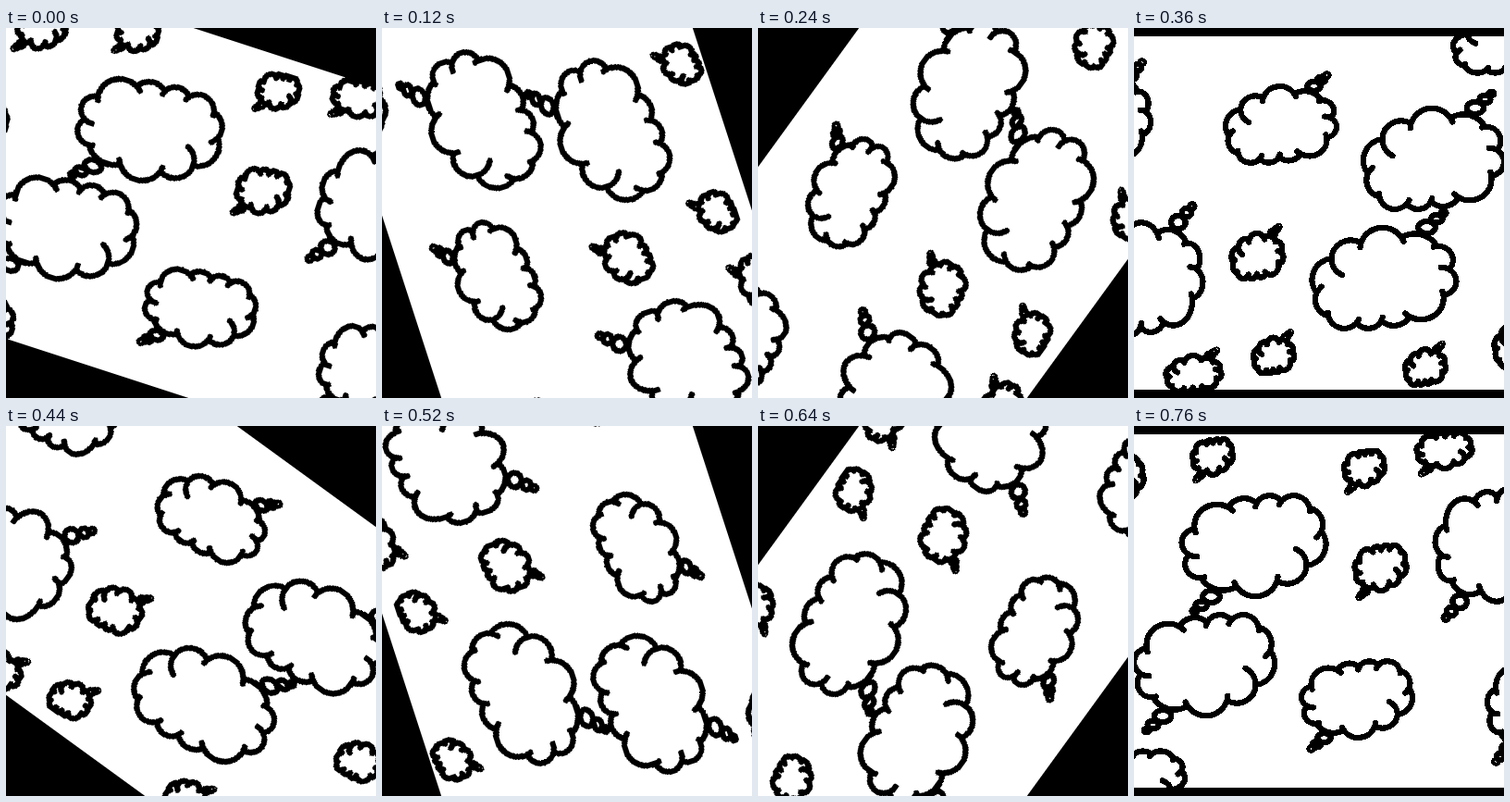
An HTML page for the animation above (0.8 s loop, 400 px wide and 400 px high).

```html
<!DOCTYPE html>
<html lang="en">
<head>
<meta charset="utf-8">
<title>Spinning thought clouds</title>
<style>
  html, body { margin: 0; width: 100%; height: 100%; overflow: hidden; background: #000; }
  svg { display: block; width: 100vw; height: 100vh; shape-rendering: crispEdges; }
  #band { transform-origin: 200px 200px; animation: spin 800ms steps(20) infinite; }
  #clouds { fill: #fff; stroke: #000; stroke-width: 6.3; stroke-linecap: round; stroke-linejoin: round; }
  #clouds .crease { fill: none; }
  @keyframes spin {
    from { transform: rotate(18deg); }
    to { transform: rotate(378deg); }
  }
</style>
</head>
<body>
<svg viewBox="0 0 400 400">
  <g id="band">
    <rect x="-200" y="9" width="800" height="382" fill="#fff"/>
    <g id="clouds"></g>
    <path d="M-200-200H600V9H-200ZM-200 391H600V600H-200Z"/>
  </g>
</svg>
<script>
const STRETCH = 1.362; // height to width of every puff

// Joints around the edge, in percent of the cloud's box: x, y, radius of the
// puff that starts here, crease angle (positive: the puff before runs on
// inwards, negative: the next one starts early)
const JOINTS = [
  [9, 33.3, 15.6, -10], [32.4, 12, 12.3, 14], [52, 8, 10.1, -14], [69.1, 5.8, 11.2, -16],
  [88.7, 12.6, 12.3, 12], [96.8, 35.5, 15.7, 26], [86.5, 69.7, 13.4, -64], [66.1, 84.9, 15.6, -12],
  [38.1, 90.5, 17.9, 12], [13.4, 81.7, 10.1, -14], [5, 58.8, 10.1, -34]
];

// Centre x, centre y, width, height relative to width
const CLOUDS = [
  [129.5, 129.5, 156, 0.7], [76, 258.5, 152, 0.72], [241, 295.5, 120, 0.69],
  [85, 33.5, 44], [249, 46, 44], [335.5, 26.5, 60, 0.65], [266.5, 153.5, 56],
  [390.5, 128.5, 130, 0.94], [-15.5, 58, 52, 0.95], [434, 301, 104, 0.92],
  [-3, 381.5, 116, 0.52], [-42.5, 175.5, 47]
];

const layer = document.getElementById("clouds");

function add(tag, attrs) {
  const el = document.createElementNS("http://www.w3.org/2000/svg", tag);
  for (const key in attrs) el.setAttribute(key, attrs[key]);
  layer.append(el);
}

// Centre of the clockwise arc of radius r from p to q, with puffs taken as round
function arcCentre([px, py], [qx, qy], r) {
  const dx = qx - px, dy = (qy - py) / STRETCH;
  const chord = Math.hypot(dx, dy);
  const k = Math.sqrt(Math.max(0, r * r - chord * chord / 4)) / chord;
  return [(px + qx) / 2 - dy * k, (py + qy) / 2 + dx * k * STRETCH];
}

// Turns a point along a puff's edge
function turn([x, y], [cx, cy], deg) {
  const a = deg * Math.PI / 180, c = Math.cos(a), s = Math.sin(a);
  const dx = x - cx, dy = (y - cy) / STRETCH;
  return [cx + dx * c - dy * s, cy + (dx * s + dy * c) * STRETCH];
}

function drawCloud([cx, cy, w, aspect = 0.88]) {
  const h = w * aspect, sx = w / 100, sy = h / 100;
  const at = ([x, y]) => `${cx + (x - 50) * sx} ${cy + (y - 50) * sy}`;
  const arc = (r, to) => `A${r * sx} ${r * STRETCH * sy} 0 0 1 ${at(to)}`;
  const n = JOINTS.length;
  let edge = "M" + at(JOINTS[0]), creases = "";

  JOINTS.forEach((joint, i) => {
    const next = JOINTS[(i + 1) % n], r = joint[2];
    const mid = arcCentre(joint, next, r);
    edge += arc(r, next);
    if (joint[3] < 0) creases += "M" + at(turn(joint, mid, joint[3])) + arc(r, joint);
    if (next[3] > 0) creases += "M" + at(next) + arc(r, turn(next, mid, next[3]));
  });
  add("path", { d: edge + "Z" });
  add("path", { d: creases, class: "crease" });

  // Tail bubbles grow from the tip towards the cloud
  [0, 0.4, 1].forEach((t, i) => add("ellipse", {
    cx: cx + (-0.41 + 0.115 * t) * w,
    cy: cy + (0.645 - 0.142 * t) * h,
    rx: 2 * (i + 1) * sx,
    ry: 2 * (i + 1) * sy
  }));
}

CLOUDS.forEach(drawCloud);
</script>
</body>
</html>
```
